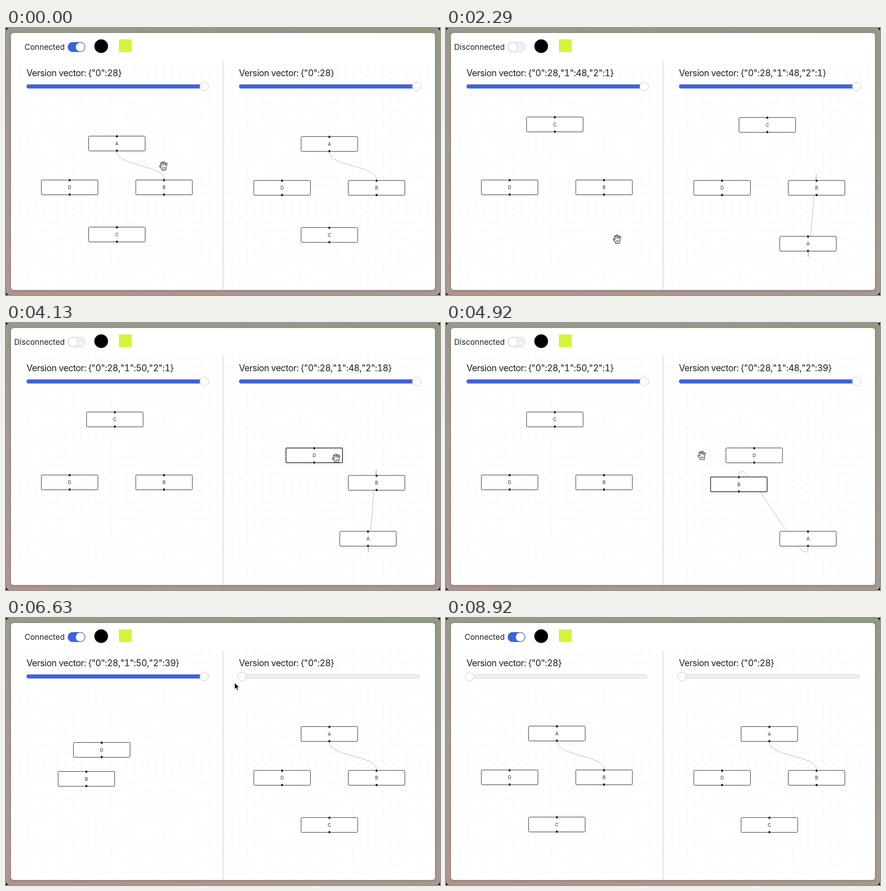
These frames come from a looping animation (953 px wide and 587 px high, 9.09 s). An HTML page:

```html
<!DOCTYPE html>
<html lang="en">
<head>
<meta charset="utf-8">
<title>Flow editor sync</title>
<style>
  html, body { margin: 0; width: 100%; height: 100%; overflow: hidden; background: #000; }
  #desk {
    position: absolute; inset: 0; border-radius: 8px;
    background: linear-gradient(195deg, #8f9a83, #9a998b 30%, #a59a90 60%, #b0958f);
  }
  #win {
    position: absolute; left: 11px; top: 11px; width: 931px; height: 565px;
    border-radius: 6px; background: #fff; box-shadow: 0 1px 5px #0004;
  }
  svg { position: absolute; left: 0; top: 0; }
  text { font-family: Inter, "Open Sans", sans-serif; fill: #1f1f1f; }
  .status { font-size: 17px; text-anchor: end; }
  .vector { font-size: 19.6px; letter-spacing: -.53px; font-variant-numeric: tabular-nums; }
  .node rect { fill: #fff; stroke: #1a192b; stroke-width: 1; }
  .node.sel rect { stroke-width: 1.5; }
  .node circle { fill: #15141f; stroke: #fff; stroke-width: .8; }
  .node text { font-size: 10px; text-anchor: middle; fill: #222; }
  .edge { fill: none; stroke: #b1b1b7; stroke-width: 1; }
  .track { fill: #f0f0f5; stroke: #cfcfd6; }
  .fill { fill: #3e63dd; }
  .knob { fill: #fff; stroke: #c4c4ca; }
  .hand { stroke-linejoin: round; stroke-linecap: round; }
  .outline { fill: #111; stroke: #111; stroke-width: 4.2; }
  .skin { fill: #fff; stroke: #fff; stroke-width: 2; }
  .crease { stroke: #111; stroke-width: .9; }
</style>
</head>
<body>
<div id="desk"></div>
<div id="win"></div>
<svg width="953" height="587" viewBox="0 0 953 587">
  <defs>
    <pattern id="dots" x="23.2" y="72.2" width="16.6" height="16.6" patternUnits="userSpaceOnUse">
      <circle cx="8.3" cy="8.3" r=".7" fill="#c6c6ca"/>
    </pattern>
    <path id="openShape" d="M-3 0L-5.3-5M-1-1L-1.7-7.3M1.8-1L2.4-7M4.3 0L6.5-4M-3.5 4L-7.4 1.2M-3.4 1L4.5 0L3.8 7.8H-3Z"/>
    <path id="fistShape" d="M-3 0L-4-1.8M-1-1V-2.6M1.8-1L2-2.6M4.3 0L5-1.6M-3.5 4L-6 2M-3.4 1L4.5 0L3.8 7.2H-3Z"/>
  </defs>
  <rect x="11" y="72" width="464" height="503" fill="url(#dots)"/>
  <rect x="478" y="72" width="464" height="503" fill="url(#dots)"/>
  <rect x="475.5" y="72" width="2" height="504" fill="#dcdcde"/>
  <text id="status" class="status" x="128.8" y="48"></text>
  <rect id="pill" x="135.5" y="31" width="38.5" height="21.8" rx="10.9"/>
  <circle id="dot" cy="41.9" r="10.2" fill="#fff"/>
  <circle cx="209" cy="40" r="15" fill="#000"/>
  <rect x="248" y="25" width="28" height="28" fill="#d4f53c"/>
  <g id="panes"></g>
  <g id="cursor">
    <path id="arrow" d="M0 0V15.2L3.5 12L6 17.8L8.6 16.7L6.1 11.1H11Z" fill="#000" stroke="#fff" stroke-width="1.1"/>
    <g id="hand" class="hand">
      <use class="outline shape"/>
      <use class="skin shape"/>
      <path class="crease" d="M-1.7 3V6.2M.5 3V6.2M2.7 3V6.2"/>
    </g>
  </g>
</svg>
<script>
const LOOP = 9090, TICK = 1000 / 24;
const GREET = 1100, CUT = 1560, DROP_A = 2285, DROP_C = 3080, JOIN = 5160, HIDE = 8910;
const OPS = 89, SPAN = 383.4;
const PANE_X = 466.6, PANE_Y = 1;
const $ = id => document.getElementById(id);

function set(el, attrs) {
  for (const k in attrs) el.setAttribute(k, attrs[k]);
}
function make(tag, parent, attrs) {
  const el = document.createElementNS("http://www.w3.org/2000/svg", tag);
  set(el, attrs);
  return parent.appendChild(el);
}
const show = (el, on) => { el.style.display = on ? "" : "none"; };

const clamp = u => Math.min(1, Math.max(0, u));
const mix = (a, b, u) => a.map((v, i) => v + (b[i] - v) * u);
const linear = u => u;
const smooth = u => u * u * (3 - 2 * u);
const cubic = u => u < .5 ? 4 * u ** 3 : 1 - 4 * (1 - u) ** 3;
const easeOut = u => 1 - (1 - u) ** 2.1;

// Each node travels while its peer's counter runs from lo to hi
const nodes = {
  A: { peer: 1, lo: 0, hi: 24, from: [243.5, 254], to: [328.3, 473.3], ease: smooth },
  B: { peer: 2, lo: 18, hi: 39, from: [347.1, 350.4], to: [176.5, 353.7], ease: easeOut, bow: -2.9 },
  C: { peer: 1, lo: 24, hi: 48, from: [243.5, 454], to: [239, 212], ease: smooth },
  D: { peer: 2, lo: 2, hi: 18, from: [139.7, 350.4], to: [210.2, 290], ease: smooth }
};

// What the pointer does; it glides from the end of one gesture to the start of the next
const drag = (start, end, node, pane, grab) => ({ start, end, node, pane, grab });
const rest = (start, end, at, node, pane) => ({ start, end, from: at, to: at, ease: linear, node, pane });
const slide = (start, end, from, to, ease, lead) => ({ start, end, from, to, ease, lead });

const slideL = slide(7704, 8040, [434, 136], [2, 132], cubic, 22);
const slideR = slide(5790, 6500, [898, 121], [504, 142], linear, 0);
const slides = [slideL, slideR];
const gestures = [
  rest(0, 10, [346, 303]),
  drag(290, 830, "A", 0, [28, 7]),
  drag(GREET, 1390, "C", 0, [10, 2]),
  rest(1530, 1600, [160, 44]),
  rest(1910, 2500, [376, 464], "A", 0),
  rest(2910, 3340, [732, 214], "C", 1),
  drag(3540, 4120, "D", 1, [48.5, 6]),
  drag(4450, 4830, "B", 1, [30, 4]),
  rest(5120, 5220, [155, 43]),
  slideR,
  slideL,
  rest(8160, 8290, [140, 95]),
  rest(8540, LOOP, [115, 78])
];
const progress = (g, t) => clamp((t - g.start) / (g.end - g.start));
const slid = (g, t) => SPAN * (1 - g.ease(progress(g, t)));

function place(name, ver) {
  const n = nodes[name];
  const p = n.ease(clamp((ver[n.peer] - n.lo) / (n.hi - n.lo)));
  const [x, y] = mix(n.from, n.to, p);
  return [x, y + (n.bow || 0) * Math.sin(Math.PI * p)];
}

function edits(t) {
  const ver = { 1: 0, 2: (t >= GREET) + (t >= DROP_C) };
  for (const g of gestures) {
    if (!g.grab || t < g.start) continue;
    const { peer, lo, hi } = nodes[g.node];
    ver[peer] = lo + Math.floor((hi - lo) * progress(g, t));
  }
  if (t >= DROP_A) ver[1] += 2;
  return ver;
}

function version(pane, t) {
  if (t >= JOIN) {
    const g = slides[pane];
    const s = Math.round(slid(g, t + g.lead) / SPAN * OPS);
    return { 1: Math.min(s, 48) + Math.max(0, s - 87), 2: Math.min(39, Math.max(0, s - 48)) };
  }
  const ver = edits(t);
  if (t >= CUT) ver[pane ? 1 : 2] = pane ? 48 : 1;
  return ver;
}

function label(ver) {
  const part = k => ver[k] ? `,"${k}":${ver[k]}` : "";
  return `Version vector: {"0":28${part(1)}${part(2)}}`;
}

function buildPane(i) {
  const g = make("g", $("panes"), { transform: `translate(${i * PANE_X} 0)` });
  const pane = { text: make("text", g, { class: "vector", x: 45, y: 105.8 }), nodes: {} };
  make("rect", g, { class: "track", x: 45.5, y: 124.5, width: 396, height: 8, rx: 4 });
  pane.fill = make("rect", g, { class: "fill", x: 45, y: 124, height: 9, rx: 4.5 });
  pane.knob = make("circle", g, { class: "knob", cy: 128.7, r: 9.6 });
  const flow = make("g", g, { transform: `translate(0 ${i * PANE_Y})` });
  pane.edge = make("path", flow, { class: "edge" });
  for (const name in nodes) {
    const n = pane.nodes[name] = make("g", flow, {});
    make("rect", n, { x: -62.1, y: -16.3, width: 124.2, height: 32.6, rx: 2 });
    for (const cy of [-15.8, 15.8]) make("circle", n, { cy, r: 2.9 });
    make("text", n, { y: 3.8 }).textContent = name;
  }
  return pane;
}
const panes = [0, 1].map(buildPane);

function edgePath([ax, ay], [bx, by]) {
  const y1 = ay + 18.3, y2 = by - 18.3, d = y2 - y1;
  const k = d >= 0 ? d / 2 : 6.25 * Math.sqrt(-d * .83);
  return `M${ax} ${y1}C${ax} ${y1 + k} ${bx} ${y2 - k} ${bx} ${y2}`;
}

const current = t => gestures.findLastIndex(g => t >= g.start);

function drawPane(i, t) {
  const pane = panes[i], ver = version(i, t), x = slid(slides[i], t);
  const shown = { A: ver[1] < 50, B: true, C: ver[2] < 2, D: true };
  const active = gestures[current(t)];
  // Deleting shows on the canvas one tick before the caption
  const said = t < JOIN ? version(i, Math.max(0, t - TICK)) : ver;
  pane.text.textContent = label(t - DROP_A < TICK ? said : ver);
  set(pane.knob, { cx: 51.8 + x });
  set(pane.fill, { width: 6.8 + x });
  show(pane.fill, x > 0);
  for (const name in pane.nodes) {
    const n = pane.nodes[name], sel = active.node === name && active.pane === i;
    set(n, { transform: `translate(${place(name, ver)})`, class: sel ? "node sel" : "node" });
    show(n, shown[name]);
  }
  set(pane.edge, { d: edgePath(place("A", ver), place("B", ver)) });
  show(pane.edge, ver[1] < 49);
}

function pointer(g, t) {
  if (!g.grab) return mix(g.from, g.to, g.ease(progress(g, t)));
  const [x, y] = place(g.node, edits(t));
  return [x + g.pane * PANE_X + g.grab[0], y + g.pane * PANE_Y + g.grab[1]];
}

function drawCursor(t) {
  const i = current(t), g = gestures[i], next = gestures[i + 1];
  let at = pointer(g, Math.min(t, g.end));
  if (t > g.end) at = mix(at, pointer(next, next.start), smooth((t - g.end) / (next.start - g.end)));
  const inFlow = at[1] > 160, shape = g.grab && t < g.end ? "#fistShape" : "#openShape";
  set($("cursor"), { transform: `translate(${at})` });
  document.querySelectorAll(".shape").forEach(el => set(el, { href: shape }));
  show($("cursor"), t < HIDE);
  show($("arrow"), !inFlow);
  show($("hand"), inFlow);
}

function drawToggle(on) {
  $("status").textContent = on ? "Connected" : "Disconnected";
  set($("pill"), { fill: on ? "#3e63dd" : "#f0f0f5", stroke: on ? "none" : "#d2d2da" });
  set($("dot"), { cx: on ? 163 : 146.6, stroke: on ? "#3e63dd" : "#c9c9d0" });
}

function draw(now) {
  const t = Math.floor((now % LOOP + 5) / TICK) * TICK;
  drawToggle(t < CUT || t >= JOIN);
  drawPane(0, t);
  drawPane(1, t);
  drawCursor(t);
}

let start;
function loop(now) {
  start ??= now;
  draw(now - start);
  requestAnimationFrame(loop);
}
draw(0);
requestAnimationFrame(loop);
</script>
</body>
</html>
```
